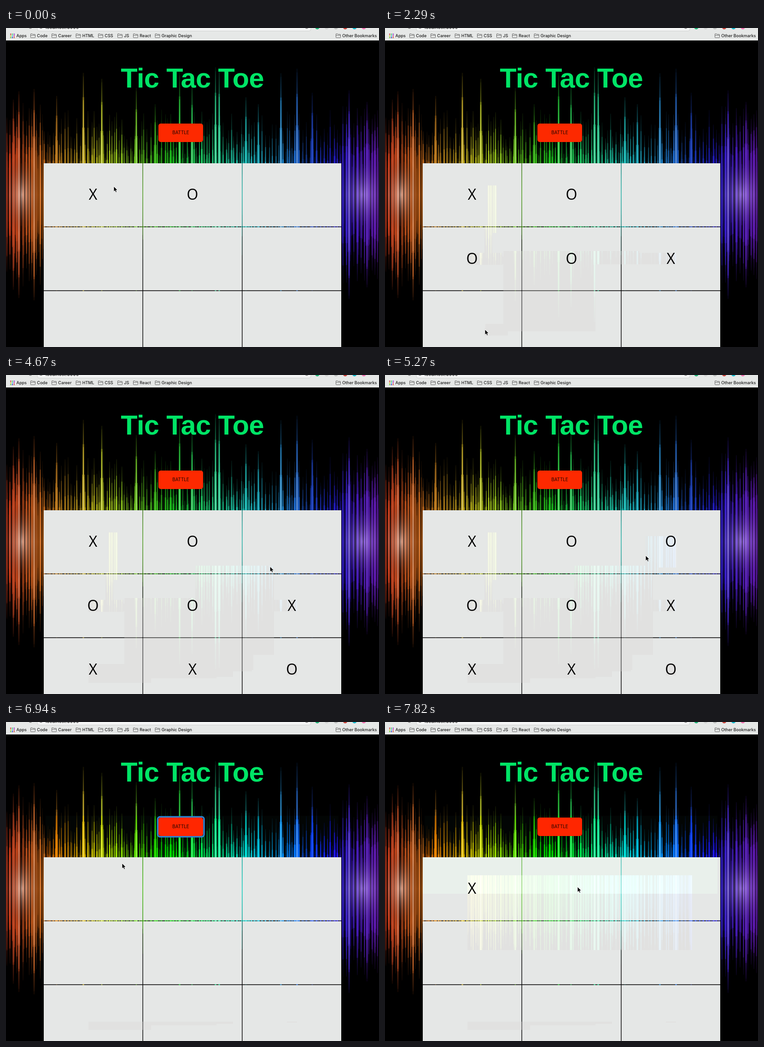
These frames come from a looping animation (810x691 px, 8000 ms). An HTML page with a canvas:

```html
<!DOCTYPE html>
<html lang="en">
<head>
<meta charset="utf-8">
<title>Tic Tac Toe</title>
<style>
  html, body { margin: 0; width: 100%; height: 100%; overflow: hidden; background: #000; }
  canvas, svg { position: absolute; left: 0; top: 0; width: 810px; height: 691px; }
  .ui { font: 500 9px Inter, Roboto, sans-serif; fill: #1c1c1c; }
  .title { font: bold 59.5px "Liberation Sans", Arial, sans-serif; letter-spacing: -.6px; fill: #00e566; text-anchor: middle; }
  .label { font: 400 9.8px Inter, Roboto, sans-serif; fill: #1a0500; text-anchor: middle; }
  .mark { font: 500 32px "Open Sans", "Noto Sans", sans-serif; fill: #000; text-anchor: middle; }
</style>
</head>
<body>
<canvas id="stage" width="810" height="691"></canvas>
<svg id="ui" viewBox="0 0 810 691">
  <defs>
    <path id="folder" fill="none" stroke="#666" d="M.5 8.5V1.2Q.5.5 1.2.5H4L5.2 1.8H9.8Q10.5 1.8 10.5 2.5V8.5Q10.5 9 9.8 9H1.2Q.5 9 .5 8.5ZM.5 3.8H10.5"/>
  </defs>
  <rect width="810" height="27" fill="#e6e8e7"/>
  <rect x="68" y="-14" width="594" height="20.5" rx="4" fill="#f4f5f5" stroke="#cfd1d0"/>
  <text class="ui" x="86" y="1.6" style="font-size:10px">localhost:3000</text>
  <g id="bar"></g>
  <text class="title" x="404.7" y="129">Tic Tac Toe</text>
  <rect id="ring" x="329.5" y="205.5" width="100.5" height="43" rx="5" fill="none" stroke="#2f80cc" stroke-width="3.5"/>
  <rect id="battle" x="331" y="207" width="97" height="40" rx="5" fill="#fd2900"/>
  <text class="label" x="379.5" y="230.3">BATTLE</text>
  <g id="marks"></g>
  <path id="cursor" d="M0 0V11.6L2.7 9.2L4.5 13.2L6.6 12.3L4.9 8.4H8.4Z" fill="#000" stroke="#fff" stroke-width=".9" stroke-linejoin="round"/>
</svg>
<script>
const LOOP = 8000, RESET = 6010, BLUR = 7230, CLEAN = 7530, MID = 361;
const $ = id => document.getElementById(id);

// Each move: first and last time, steps, mark placed, first and last cursor position
const moves = [
  [0, 0, 1, "", 234, 343, 234, 343],
  [150, 360, 2, "", 224, 430, 217, 499],
  [660, 960, 3, "O3", 246, 498, 579, 497],
  [1410, 1550, 2, "X5", 543, 497, 448, 485],
  [2000, 2290, 3, "O4", 258, 643, 217, 653],
  [3040, 3470, 4, "X6", 306, 640, 528, 625],
  [3920, 4220, 3, "O8", 528, 625, 412, 592],
  [4520, 4820, 3, "X7", 412, 592, 584, 403],
  [5270, 5710, 4, "O2", 566, 391, 388, 234],
  [RESET, RESET, 1, "", 388, 234, 388, 234],
  [6610, 6940, 3, "", 352, 262, 252, 306],
  [BLUR, CLEAN, 3, "", 220, 318, 240, 334],
  [7670, 7820, 2, "X0", 658, 480, 418, 357]
];
const markAt = i => [189 + i % 3 * 215.9, 361 + Math.floor(i / 3) * 138.4];
const easeOut = p => 1 - (1 - p) ** 4;

const steps = moves.flatMap(([t0, t1, n, mark, x0, y0, x1, y1]) =>
  Array.from({ length: n }, (_, i) => {
    const p = n > 1 ? i / (n - 1) : 0, e = easeOut(p);
    return { t: t0 + (t1 - t0) * p, x: x0 + (x1 - x0) * e, y: y0 + (y1 - y0) * e, mark: i ? "" : mark };
  }));

// The repainted box spans old cursor, new cursor and new mark
steps.forEach((s, i) => {
  const prev = steps[i - 1];
  if (!prev || (s.t >= RESET && s.t <= CLEAN)) return;
  const parts = [];
  if (prev.x !== s.x || prev.y !== s.y)
    for (const { x, y } of [prev, s]) parts.push([x - 1.5, y - 2, x + 9, y + 14]);
  if (s.mark) {
    const [x, y] = markAt(+s.mark[1]);
    parts.push([x - 10.5, y - 12, x + 11, y + 13]);
  }
  const edge = (k, pick) => Math.round(pick(...parts.map(b => b[k])));
  s.box = [edge(0, Math.min), edge(1, Math.min), edge(2, Math.max), edge(3, Math.max)];
});

// x and top of the tallest spikes
const peaks = [[16, 155], [28, 137], [61, 132], [110, 147], [168, 97], [208, 110], [283, 130],
  [324, 165], [377, 95], [404, 118], [455, 85], [463, 88], [521, 150], [548, 165],
  [597, 98], [632, 88], [665, 140], [745, 135], [784, 160]];
const hues = [[0, 10], [80, 27], [168, 50], [380, 128], [520, 178], [700, 238], [811, 270]];

function hueAt(x) {
  const i = Math.max(1, hues.findIndex(h => h[0] >= x));
  const [x0, h0] = hues[i - 1], [x1, h1] = hues[i];
  return h0 + (h1 - h0) * (x - x0) / (x1 - x0);
}

let seed = 11;
const rnd = (a = 0, b = 1) => a + (b - a) * (seed = seed * 16807 % 2147483647) / 2147483647;

function layer() {
  const c = document.createElement("canvas");
  c.width = 810; c.height = 691;
  return [c, c.getContext("2d")];
}

function spike(g, x, half, w, light, sat = 82) {
  const grad = g.createLinearGradient(0, MID - half, 0, MID + half);
  [[0, .15], [.12, .55], [.3, .9], [.5, 1]].forEach(([p, a]) => {
    const color = `hsla(${hueAt(x)},${sat}%,${light * (.65 + p * .8)}%,${a})`;
    grad.addColorStop(p, color);
    grad.addColorStop(1 - p, color);
  });
  g.fillStyle = grad;
  for (const k of [1, .8, .55]) {
    const width = w * (1.35 - k);
    g.fillRect(x - width / 2, MID - half * k, width, half * k * 2);
  }
}

function glow(g, x, color, rx, ry) {
  g.save();
  g.globalCompositeOperation = "source-atop";
  g.translate(x, MID);
  g.scale(rx, ry);
  const grad = g.createRadialGradient(0, 0, 0, 0, 0, 1);
  grad.addColorStop(0, color);
  grad.addColorStop(1, "transparent");
  g.fillStyle = grad;
  g.fillRect(-1, -1, 2, 2);
  g.restore();
}

function drawWave() {
  const [c, g] = layer();
  const outer = x => x < 82 || x > 728;
  for (let x = 0; x < 810; x += rnd(1.5, 3.5))
    spike(g, x, outer(x) ? rnd(95, 175) : rnd(70, 125), rnd(2, 4), rnd(12, 36));
  for (let x = 2; x < 810; x += rnd(4, 10))
    spike(g, x, outer(x) ? rnd(150, 205) : rnd(120, 185), rnd(3, 5), rnd(34, 56), 74);
  for (const [x, top] of peaks) {
    const half = MID - top;
    spike(g, x, half, 7, 40);
    spike(g, x, half * .97, 3, half > 222 ? 70 : 54, 62);
  }
  glow(g, 35, "rgba(255,222,208,.6)", 40, 85);
  glow(g, 775, "rgba(225,205,255,.45)", 60, 90);
  return c;
}

const wave = drawWave();
const [vivid, vg] = layer();
vg.filter = "saturate(1.4) brightness(1.1)";
vg.drawImage(wave, 0, 0);

const cells = new Path2D();
for (let i = 0; i < 9; i++)
  cells.rect(82 + i % 3 * 215.8, 293 + Math.floor(i / 3) * 138.4, 214.4, 136.8);

const ctx = $("stage").getContext("2d");

function paint(t, done) {
  const fresh = t >= RESET;
  ctx.fillStyle = "#000";
  ctx.fillRect(0, 0, 810, 691);
  ctx.drawImage(wave, 0, 0);
  if (fresh) {
    ctx.fillStyle = "#020504";
    ctx.fillRect(86, 203, 636, 90);
    ctx.drawImage(vivid, 86, 203, 636, 446, 86, 203, 636, 446);
  }
  ctx.fillStyle = "#e5e7e6";
  ctx.fill(cells);

  const area = new Path2D();
  for (const { t: at, box } of done) {
    if (!box) continue;
    const [x0, y0, x1, y1] = box;
    const top = fresh && at < RESET ? Math.max(y0, 649) : y0;
    if (y1 > top) area.rect(x0, top, x1 - x0, y1 - top);
  }
  ctx.save();
  ctx.clip(cells);
  ctx.fillStyle = "#e1e1e0";
  ctx.fill(area);
  if (t >= BLUR) {
    ctx.fillStyle = "#e9f0eb";
    ctx.fillRect(82, 293, 640, 79);
  }
  ctx.clip(area);
  ctx.globalCompositeOperation = "lighter";
  ctx.globalAlpha = .11;
  ctx.drawImage(wave, 0, 0);
  ctx.restore();
}

function add(parent, tag, attrs, text = "") {
  const el = document.createElementNS("http://www.w3.org/2000/svg", tag);
  for (const k in attrs) el.setAttribute(k, attrs[k]);
  el.textContent = text;
  return parent.appendChild(el);
}

const bar = $("bar");
for (let i = 0; i < 9; i++)
  add(bar, "rect", { x: 9 + i % 3 * 3.8, y: 12.3 + Math.floor(i / 3) * 3.6, width: 2.4, height: 2.4,
    fill: `hsl(${i * 137 % 360},65%,52%)` });
add(bar, "text", { x: 22.5, y: 20.4, class: "ui" }, "Apps");
[[53, "Code"], [99, "Career"], [151.5, "HTML"], [200, "CSS"], [242, "JS"], [276, "React"],
  [323.5, "Graphic Design"], [716, "Other Bookmarks"]].forEach(([x, name]) => {
  add(bar, "use", { href: "#folder", x, y: 12 });
  add(bar, "text", { x: x + 14.3, y: 20.4, class: "ui" }, name);
});
["#20b578", "#cfd1d0", "#b9bbba", "#c8453c", "#12b8cc", "#f070b0"].forEach((fill, i) =>
  add(bar, "circle", { cx: 676 + i * 20.2, cy: -1.8, r: 4.8, fill }));
for (const cx of [53, 76, 653]) add(bar, "circle", { cx, cy: -2, r: 3.6, fill: "#777" });

const marks = Array.from({ length: 9 }, (_, i) => {
  const [x, y] = markAt(i);
  return add($("marks"), "text", { class: "mark", x, y: y + 11.4 });
});

let shown = 0;
function show(t) {
  const done = steps.filter(s => s.t <= t);
  if (done.length === shown) return;
  shown = done.length;
  const { x, y } = done[shown - 1];
  const fresh = t >= RESET;
  const board = fresh ? [] : ["X", "O"];
  for (const s of done)
    if (s.mark && (!fresh || s.t >= RESET)) board[s.mark[1]] = s.mark[0];
  marks.forEach((el, i) => { el.textContent = board[i] || ""; });
  $("cursor").setAttribute("transform", `translate(${x} ${y})`);
  $("ring").style.display = fresh && t < BLUR ? "" : "none";
  $("battle").setAttribute("fill", fresh ? "#ff2600" : "#fd2900");
  paint(t, done);
}

const start = performance.now();
function tick() {
  show((performance.now() - start) % LOOP);
  requestAnimationFrame(tick);
}
tick();
</script>
</body>
</html>
```
